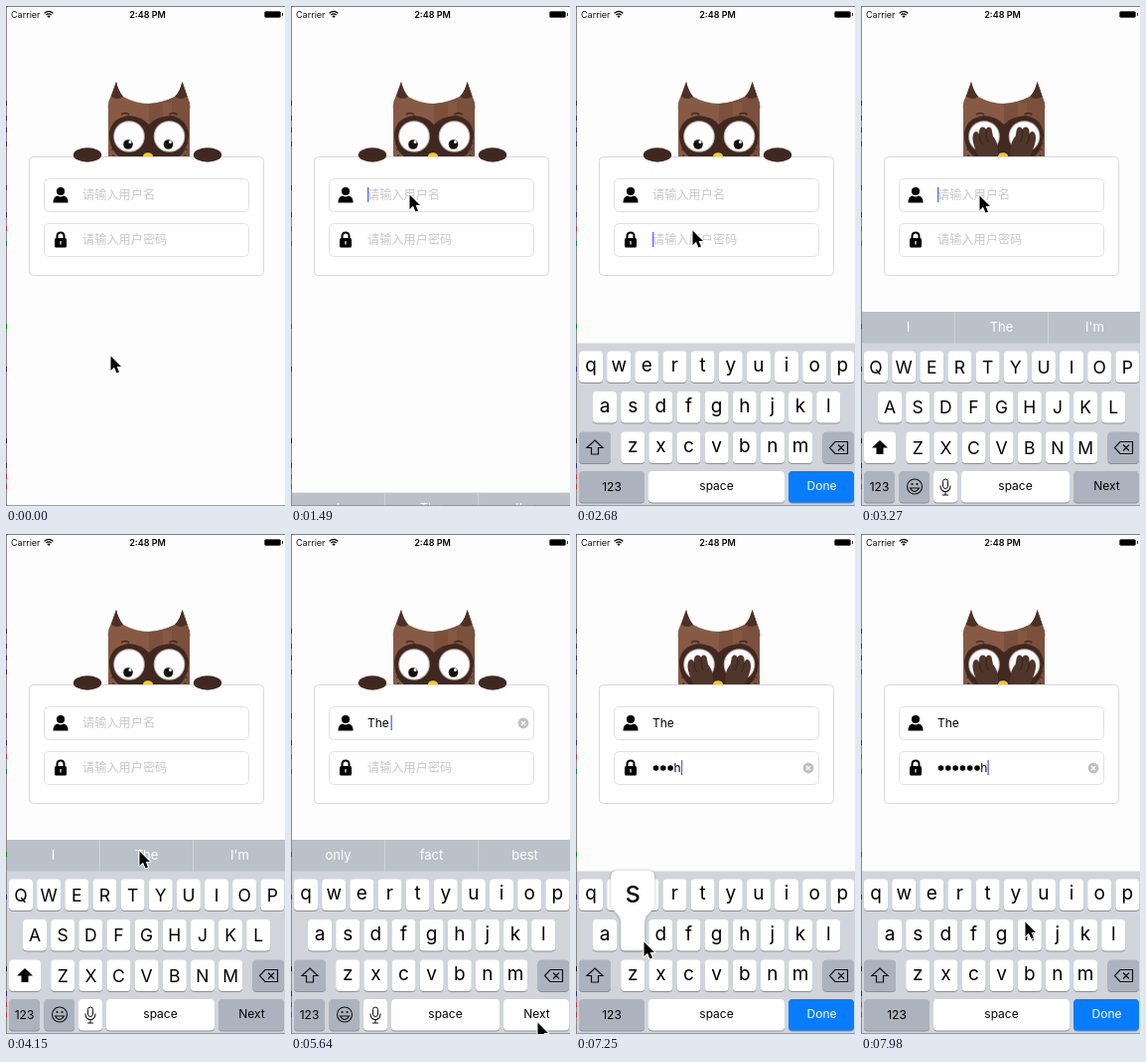
Write an HTML page with a canvas that moves like this. It is 281 by 502 pixels and loops after 8 s.

```html
<!DOCTYPE html>
<html lang="zh">
<head>
<meta charset="utf-8">
<style>
html, body { margin: 0; width: 100%; height: 100%; overflow: hidden; background: #fdfdfd; }
canvas { display: block; width: 281px; height: 502px; }
</style>
</head>
<body>
<canvas id="stage"></canvas>
<script>
const W = 281, H = 502, LOOP = 8000;
const canvas = document.getElementById('stage');
const c = canvas.getContext('2d');
const dpr = window.devicePixelRatio || 1;
canvas.width = W * dpr;
canvas.height = H * dpr;

const SANS = 'Inter, Roboto, sans-serif';
const CJK = '"Noto Sans CJK SC", "Noto Sans CJK", sans-serif';
const DARK = '#402820', GREY_KEY = '#adb3be';

// Pointer path: time, x, y of the tip
const route = [
  [0, 105, 351], [140, 105, 351], [600, 124, 268], [1040, 119, 189], [2000, 119, 189],
  [2530, 117, 225], [2850, 117, 225], [3200, 119, 190], [3330, 119, 190], [3710, 130, 383],
  [3800, 131, 383], [4150, 134, 318], [4550, 134, 318], [5190, 248, 490], [5850, 248, 490],
  [6350, 168, 404], [6520, 167, 404], [7050, 165, 402], [7220, 68, 409], [7370, 68, 409],
  [7540, 165, 400], [7690, 165, 394], [7980, 165, 389], [8000, 165, 389]
];
// Password taps: key, press, release
const taps = [
  ['h', 6370, 6510], ['h', 6650, 6760], ['h', 6800, 6900], ['h', 6950, 7050],
  ['s', 7200, 7370], ['h', 7540, 7670], ['h', 7800, 7930]
];

const clamp = v => Math.max(0, Math.min(1, v));
const smooth = (t, start, length) => {
  const p = clamp((t - start) / length);
  return p * p * (3 - 2 * p);
};

function pointerAt(t) {
  const i = Math.max(1, route.findIndex(r => r[0] >= t));
  const [t0, x0, y0] = route[i - 1], [t1, x1, y1] = route[i];
  const p = smooth(t, t0, t1 - t0);
  return [x0 + (x1 - x0) * p, y0 + (y1 - y0) * p];
}

function fill(d, color) {
  c.fillStyle = color;
  c.fill(typeof d === 'string' ? new Path2D(d) : d);
}
function line(d, color, width = 1) {
  c.strokeStyle = color;
  c.lineWidth = width;
  c.stroke(new Path2D(d));
}
function oval(x, y, rx, ry, color) {
  const p = new Path2D();
  p.ellipse(x, y, rx, ry, 0, 0, 7);
  fill(p, color);
}
const dot = (x, y, r, color) => oval(x, y, r, r, color);
function rect(x, y, w, h, color) {
  c.fillStyle = color;
  c.fillRect(x, y, w, h);
}
function round(x, y, w, h, r, color, border) {
  const p = new Path2D();
  p.roundRect(x, y, w, h, r);
  fill(p, color);
  if (border) {
    c.strokeStyle = border;
    c.lineWidth = 1;
    c.stroke(p);
  }
}
function text(s, x, y, size, color = '#000', align = 'center', weight = 400, family = SANS) {
  c.font = `${weight} ${size}px ${family}`;
  c.textAlign = align;
  c.fillStyle = color;
  c.fillText(s, x, y);
}

function statusBar() {
  text('Carrier', 5, 12, 9, '#111', 'left');
  text('2:48 PM', 142.5, 12, 9, '#000', 'center', 600);
  line('M38.6 7.2Q43 3.6 47.4 7.2M40.4 9Q43 6.9 45.6 9', '#000', 1.3);
  fill('M41.4 10.2Q43 9 44.6 10.2L43 12Z', '#000');
  round(260.5, 5.5, 16, 6, 1.5, '#000', '#555');
  rect(278, 7, 1, 3, '#333');
}

function wing() {
  fill('M118 151C115 143 111 135 113 129C114 125 118 125 119 129C118 122 123 119 126 124' +
    'C127 120 132 121 132 126L133 131C137 135 139 143 138 151Z', '#50352a');
  line('M119 129Q119 135 122 139M126 124Q125 132 128 137', '#38221a', 1);
}

function mirrored(draw) {
  draw();
  c.save();
  c.translate(288.5, 0);
  c.scale(-1, 1);
  draw();
  c.restore();
}

function owl(cover) {
  c.save();
  c.beginPath();
  c.rect(0, 0, W, 151);
  c.clip();
  fill('M103 152V104Q102 97 105 92L111 76Q113 85 118 91Q143 105 170 91Q176 85 177.5 76L183 92Q186 98 185 104V152Z', '#875a45');
  fill('M144 98Q158 97 170 91Q176 85 177.5 76L183 92Q186 98 185 104V152H144Z', '#7b503d');
  rect(158, 97, 9, 20, '#86583f');
  mirrored(() => {
    fill('M106 91L111 76Q113 85 118 91Q113 95 106 91Z', '#4b3025');
    line('M116 109Q120 106 124 109', DARK, 1.6);
    for (let i = 0; i < 7; i++) dot(106 + i * 3 % 8, 138 + i * 2, 1, '#4b3025');
  });
  fill('M104 128Q106 112 124 110Q137 111 144 119Q151 111 166 110Q183 113 184 130Q182 147 173 152H115Q104 145 104 128Z', DARK);
  for (const x of [124, 164.5]) {
    dot(x, 131, 15.8, '#b9b2ae');
    dot(x, 131, 14.8, '#fdfdfd');
  }
  dot(123, 139, 4.8, '#17100e');
  dot(163.5, 139, 4.8, '#17100e');
  dot(125, 136.5, 1.5, '#fff');
  dot(165.5, 136.5, 1.5, '#fff');
  oval(143, 151, 5, 3.8, '#f6cf13');
  if (cover > 0) {
    c.translate(0, 34 * (1 - cover));
    mirrored(wing);
  }
  c.restore();
}

function form(s) {
  round(23.5, 151.5, 236, 119, 4, '#fff', '#d8d8d8');
  if (s.cover < 1) {
    const k = 1 - s.cover;
    oval(82 + 30 * s.cover, 149.5, 14.2 * k, 7.2 * k, DARK);
    oval(203 - 30 * s.cover, 149.5, 14.2 * k, 7.2 * k, DARK);
  }
  round(38.5, 173.5, 206, 33, 5, '#fff', '#e0e0e0');
  round(38.5, 218.5, 206, 33, 5, '#fff', '#e0e0e0');

  dot(55, 186, 4.1, '#000');
  fill('M47.5 197.5Q47.5 191 52 190.5Q55 192.5 58 190.5Q62.5 191 62.5 197.5Z', '#000');
  round(49, 233, 12, 9.5, 1.5, '#000');
  line('M51.5 234V231Q51.5 227.5 55 227.5Q58.5 227.5 58.5 231V234', '#000', 2);
  rect(54.4, 236, 1.2, 3.5, '#fff');

  const hint = (str, y) => text(str, 77, y, 12.2, '#c7c7cc', 'left', 300, CJK);
  let caretX = 77;
  if (s.named) {
    text('The', 77, 194, 12, '#000', 'left');
    caretX = 100.5;
  } else hint('请输入用户名', 194);

  const n = s.typed.length;
  if (n) {
    for (let i = 0; i < n - 1; i++) dot(80.5 + i * 7.3, 235, 2.8, '#000');
    const x = 77 + (n - 1) * 7.2;
    text(s.typed[n - 1], x, 239, 12, '#000', 'left');
    if (s.secure) caretX = x + 7.3;
  } else {
    hint('请输入用户密码', 239);
    if (s.secure) caretX = 77;
  }
  if (s.caret) rect(caretX, s.secure ? 227 : 182, 1.3, 15, '#4b69e6');
  const active = s.secure ? n : s.named;
  if (active) {
    const y = s.secure ? 235 : 190;
    dot(234, y, 5.4, '#bfbfc4');
    line(`M232 ${y - 2}l4 4m0 -4l-4 4`, '#fff', 1.1);
  }
}

function key(x, y, w, color = '#fff') {
  round(x, y + 1, w, 31.5, 4, '#8b8e94');
  round(x, y, w, 31.5, 4, color);
}

function popup(letter, x, y) {
  c.save();
  c.shadowColor = 'rgba(0,0,0,.3)';
  c.shadowBlur = 3 * dpr;
  fill(`M${x - 16} ${y - 49}h32q6 0 6 6v27c0 9 -10 9 -10 19v24q0 4 -4 4h-16q-4 0 -4 -4v-24` +
    'c0 -10 -10 -10 -10 -19v-27q0 -6 6 -6z', '#fff');
  c.restore();
  text(letter, x, y - 17, 30);
}

function keyboard(s) {
  c.save();
  c.translate(0, 195 * s.drop);
  if (!s.secure) {
    rect(1, 307, 280, 32, '#bac1c9');
    rect(94, 307, 1, 32, '#cdd2d8');
    rect(188, 307, 1, 32, '#cdd2d8');
    const words = s.named ? ['only', 'fact', 'best'] : ['I', 'The', "I'm"];
    words.forEach((w, i) => text(w, 47.5 + i * 94, 327, 13, '#fff'));
  }
  rect(1, 338.5, 280, 163.5, '#d1d5db');

  let pressed;
  ['QWERTYUIOP', 'ASDFGHJKL', 'ZXCVBNM'].forEach((row, r) => {
    const y = 346.5 + 40.5 * r;
    [...row].forEach((ch, i) => {
      const x = [15, 29, 57.2][r] + 28.15 * i;
      const label = s.lower ? ch.toLowerCase() : ch;
      key(x - 12, y, 24);
      text(label, x, y + (s.lower ? 20.5 : 22), s.lower ? 19 : 17.5);
      if (label === s.press) pressed = [label, x, y];
    });
  });

  key(3, 427.5, 32, s.lower ? GREY_KEY : '#fff');
  const arrow = 'M19 436L27 443.5H22.5V450H15.5V443.5H11Z';
  if (s.lower) line(arrow, '#111', 1.2);
  else fill(arrow, '#000');
  key(248.5, 427.5, 31.5, GREY_KEY);
  line('M261 437.5H273.5V449.5H261L255.5 443.5ZM264 440.5l6 6m0 -6l-6 6', '#111', 1.2);

  key(3, 467, s.secure ? 66 : 31, GREY_KEY);
  text('123', s.secure ? 36 : 18.5, 486.5, 12);
  if (s.secure) key(73, 467, 137);
  else {
    key(38.5, 467, 30.5, GREY_KEY);
    line('M61.5 482.5A7.5 7.5 0 1 1 46.5 482.5A7.5 7.5 0 1 1 61.5 482.5M49.5 484Q54 491 58.5 484Z', '#111', 1.1);
    dot(51.5, 480, 1.1, '#111');
    dot(56.5, 480, 1.1, '#111');
    key(73, 467, 24);
    round(82.5, 475, 5, 9.5, 2.5, '#fff', '#111');
    line('M80 481.5Q80 487.5 85 487.5Q90 487.5 90 481.5M85 487.5V491M82 491H88', '#111', 1.1);
    key(101, 467, 109);
  }
  text('space', s.secure ? 141.5 : 155.5, 486, 12);
  key(214, 467, 66, s.secure ? '#087cff' : s.next ? '#fff' : GREY_KEY);
  text(s.secure ? 'Done' : 'Next', 247.5, 486, 12, s.secure ? '#fff' : '#000');
  if (pressed) popup(...pressed);
  c.restore();
}

function pointer(x, y) {
  c.save();
  c.translate(x, y);
  c.lineJoin = 'round';
  const d = 'M.5 .5V15L4 11.8L6.5 17.5L9 16.4L6.6 11H11Z';
  line(d, '#fff', 2);
  fill(d, '#000');
  c.restore();
}

function frame() {
  rect(0, 0, 1, H, '#8a8a8c');
  rect(0, 0, W, 0.7, '#4a4a4c');
  rect(0, 501.2, W, 0.8, '#8a8a8c');
  const marks = { '#3b2a8c': [95, 110, 122, 136, 180, 207, 362, 459], '#c33': [221, 470, 480], '#177': [236], '#080': [319], '#111': [434] };
  for (const color in marks) for (const y of marks[color]) rect(0, y, 1, 5, color);
}

function stateAt(t) {
  const secure = t >= 2680 && t < 3270 || t >= 5760;
  const named = t >= 4450;
  const done = taps.filter(k => t >= k[2]);
  const held = taps.find(k => t >= k[1] && t < k[2]);
  const resets = [1490, 2680, 3270, 4450, 5760, ...done.map(k => k[2])];
  const last = Math.max(0, ...resets.filter(r => r <= t));
  return {
    secure, named,
    lower: named || secure,
    typed: done.map(k => k[0]),
    press: held && held[0],
    next: t >= 5490 && t < 5760,
    caret: last > 0 && (t - last) % 1000 < 500,
    cover: smooth(t, 2680, 280) - smooth(t, 3270, 280) + smooth(t, 5760, 280),
    drop: Math.pow(1 - clamp((t - 1480) / 470), 3)
  };
}

function draw(now) {
  const t = now % LOOP, s = stateAt(t);
  c.setTransform(dpr, 0, 0, dpr, 0, 0);
  rect(0, 0, W, H, '#fdfdfd');
  statusBar();
  owl(s.cover);
  form(s);
  if (s.drop < 1) keyboard(s);
  frame();
  pointer(...pointerAt(t));
  requestAnimationFrame(draw);
}
requestAnimationFrame(draw);
</script>
</body>
</html>
```
